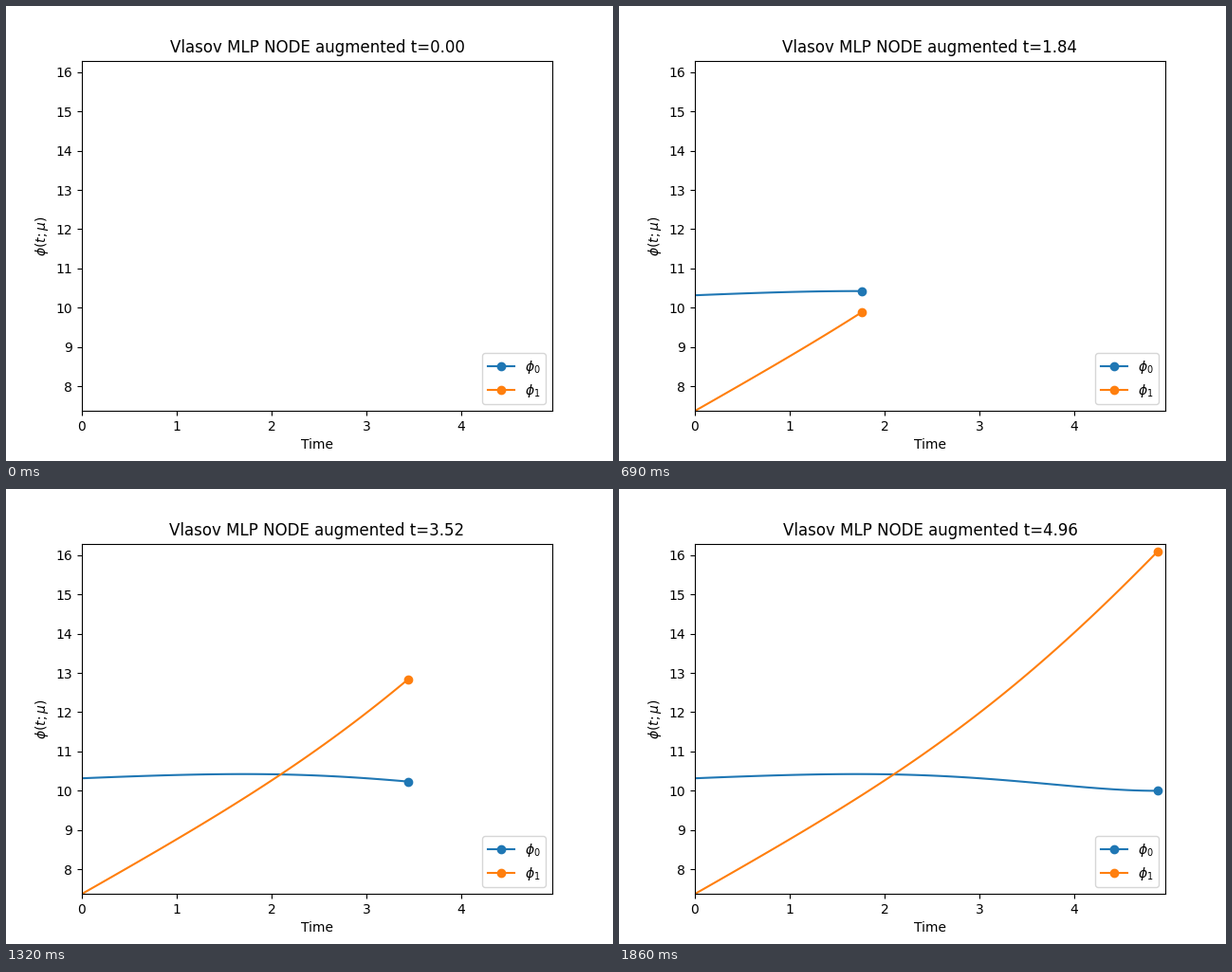
Animation, 640 px wide and 480 px high, one loop 1.89 s. Source, as a matplotlib script:

```python
import numpy as np
import matplotlib.pyplot as plt
from matplotlib.animation import FuncAnimation

FRAMES = 63
STEP = 0.08
INTERVAL = 30
KEY_TIMES = [0, 0.96, 1.76, 2.96, 3.92, 4.96]

times = STEP * np.arange(FRAMES)


def curve(*values):
    """Smooth polynomial path through one value per key time."""
    return np.polyval(np.polyfit(KEY_TIMES, values, len(values) - 1), times)


paths = [
    curve(10.32, 10.401, 10.427, 10.327, 10.133, 10.004),
    curve(7.3784, 8.713, 9.89, 11.909, 13.848, 16.2884),
]

fig, ax = plt.subplots(figsize=(6.4, 4.8), dpi=100)
ax.set_xlim(0, times[-1])
ax.set_ylim(np.min(paths), np.max(paths))
ax.set_xlabel("Time")
ax.set_ylabel(r"$\phi(t;\mu)$")
title = ax.set_title("")

# Only the newest point carries a marker.
lines = [
    ax.plot([], [], "o-", markevery=slice(-1, None), label=rf"$\phi_{k}$")[0]
    for k in range(len(paths))
]
ax.legend(loc="lower right")


def update(i):
    for line, path in zip(lines, paths):
        line.set_data(times[:i], path[:i])
    title.set_text(f"Vlasov MLP NODE augmented t={times[i]:.2f}")
    return [*lines, title]


anim = FuncAnimation(fig, update, frames=FRAMES, interval=INTERVAL,
                     repeat=True, repeat_delay=0)
plt.show()
```
